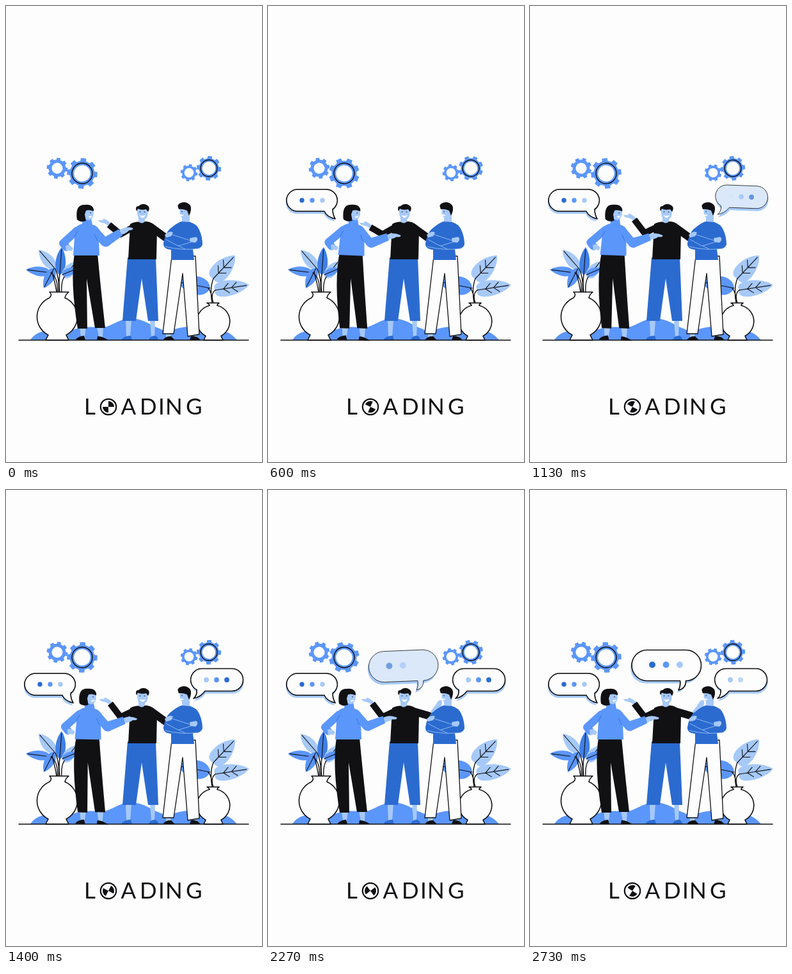
Recreate the animation shown at these times as an HTML page. Size 400 by 711 pixels, loop 2790 ms.

```html
<!DOCTYPE html>
<html lang="en">
<head>
<meta charset="utf-8">
<title>Loading</title>
<style>
  html, body { margin: 0; height: 100%; overflow: hidden; background: #fdfdfd; }
  svg { display: block; width: 100vw; height: 100vh; }
  .ink { fill: #111114; }
  .blue { fill: #5b96fb; }
  .deep { fill: #2b6bd0; }
  .skin { fill: #a6c9f8; }
  .paper { fill: #fdfdfd; }
  .mint { fill: #dae8fa; }
  .shade { fill: #a6c9f8; }
  .line { fill: none; stroke: #111114; stroke-width: 1.4; stroke-linecap: round; }
  .outlined { stroke: #111114; stroke-width: 1.6; stroke-linejoin: round; }
  .limb { fill: none; stroke-linejoin: round; stroke-linecap: round; }
  text { font: 35px Lato, "Open Sans", sans-serif; }
</style>
</head>
<body>
<svg viewBox="0 0 400 711" preserveAspectRatio="none">
  <rect class="paper" width="400" height="711"/>
  <g id="gears"></g>
  <path class="blue" d="M38 521C46 508 58 508 68 504Q85 512 104 505C120 499 135 500 150 502C168 498 178 487 196 487C216 488 226 498 240 503C252 510 262 502 284 500C306 500 316 506 330 505C345 506 354 512 361 521Z"/>
  <g id="plants"></g>

  <g class="paper outlined">
    <path d="M68 446H98Q93 450 92 455A32 32 0 0 1 94 513L98 521H62L66 513A32 32 0 0 1 68 455Q73 450 68 446Z"/>
    <path d="M314 463H333Q330 465 330 467A25.5 25.5 0 0 1 336 514.5L339 521H309L312 514.5A25.5 25.5 0 0 1 318 467Q318 465 314 463Z"/>
  </g>

  <g id="middleMan">
    <path class="skin" d="M187 490H196L194 516H188ZM225 490H233L232 516H227Z"/>
    <path class="deep" d="M180 521Q184 514 195 514L197 521ZM223 521Q225 514 233 514Q238 516 238 521Z"/>
    <path class="deep" d="M190 392H234L238 491H222L212 425L203 491H182Z"/>
    <path id="raisedHand" class="skin" d="M250 350Q259 340 266 329Q271 325 272 330Q273 337 265 345Q259 353 254 357Z"/>
    <path id="farArm" class="limb" stroke="#111114" stroke-width="12"/>
    <g id="nearHand"><path class="skin" d="M9 8Q3 3 -3 2Q-8 1 -9 -2L-1 -2Q-3 -5 1 -4Q6 -2 12 4Z"/></g>
    <path id="nearArm" class="limb" stroke="#111114" stroke-width="10" style="stroke-linecap:butt"/>
    <path class="ink" d="M194 340Q202 335 212 337Q222 334 230 340L236 350L235 395H191Z"/>
    <path class="skin" d="M207 329H217V336Q212 341 207 336Z"/>
    <path class="skin" d="M205 316H221Q224 332 213 334Q204 333 205 316Z"/>
    <path class="ink" d="M204 320Q201 312 207 312Q214 306 221 311Q226 314 222 321L219 317Q211 319 206 316Z"/>
    <path class="paper" d="M208 326Q213 328 218 326Q216 331 212 330Z"/>
    <path class="line" style="stroke-width:1" d="M209 321h1M216 321h1"/>
  </g>

  <g id="woman">
    <path class="skin" d="M115 500H125L123 516H117ZM142 500H152L151 516H145Z"/>
    <path class="ink" d="M108 521Q112 515 122 514L124 521ZM142 521L143 515Q149 514 160 521Z"/>
    <path class="ink" d="M107 386H143Q148 440 155 502H139L126 425L127 503H112Q100 430 107 386Z"/>
    <path class="limb" stroke="#5b96fb" stroke-width="12" d="M111 350L89 370L94 376"/>
    <path class="skin" d="M93 374Q99 371 105 378L102 382Q98 380 94 383Z"/>
    <path class="blue" d="M109 345Q115 340 119 340L120 331H133L135 341Q143 342 147 352L145 364L146 389H105L107 362Z"/>
    <path class="limb" stroke="#5b96fb" stroke-width="13" d="M139 351L154 368"/>
    <g id="forearm">
      <path class="skin" d="M177 350Q186 343 198 346Q200 349 192 350Q189 354 180 357Z"/>
      <path class="blue" d="M151 362L176 348L182 358L159 375Q151 377 148 370Z"/>
    </g>
    <path fill="none" stroke="#2b6bd0" stroke-width=".8" d="M107 360L112 351M143 366L138 356"/>
    <path class="skin" d="M121 316H136L137 324Q136 332 130 334L121 332Z"/>
    <path class="ink" d="M111 333C109 318 112 309 124 310C133 309 138 314 137 320Q130 317 125 319L123 325L125 335Q116 338 111 333Z"/>
    <path class="line" style="stroke-width:1" d="M132 322v1"/>
    <path class="paper" d="M129 328L135 327Q133 331 130 330Z"/>
  </g>

  <g id="rightMan">
    <path class="skin" d="M250 509H258L257 517H250ZM289 509H297L298 517H291Z"/>
    <path class="ink" d="M245 521Q249 515 258 515L264 521ZM287 521L289 515Q297 513 304 521Z"/>
    <path class="paper outlined" style="stroke-width:1.3" d="M259 390H296L302 512L284 515L276 417L262 511H245Z"/>
    <path class="skin" d="M275 326H287V340Q280 342 275 338Z"/>
    <path class="deep" d="M258 346Q266 339 274 336L288 337Q298 340 302 349Q307 360 307 372Q304 380 292 379L294 396H258L258 380Q245 379 246 370Q249 352 258 346Z"/>
    <path class="skin" d="M248 357Q254 350 261 353L258 359L250 361ZM287 362L297 360Q302 364 296 369L288 368Z"/>
    <path fill="none" stroke="#a6c9f8" stroke-width=".8" d="M258 356L289 366M250 364Q262 371 280 379M270 374L289 368M249 375Q275 382 303 378"/>
    <path class="skin" d="M272 315H286V325Q283 331 275 330Q270 326 272 315Z"/>
    <path class="ink" d="M270 317Q266 309 273 307Q282 304 288 311Q291 317 286 327L283 319Q276 316 270 317Z"/>
    <path class="line" style="stroke-width:1" d="M275 320v1"/>
    <path class="paper" d="M272 325L278 326Q275 329 272 327Z"/>
  </g>
  <path class="line" d="M20 521H379"/>
  <g id="bubbles"></g>

  <text class="ink" y="637" x="122 179.5 209 238 249 281">LADING</text>
  <circle class="line" cx="160" cy="625" r="12.2" style="stroke-width:2.2"/>
  <path id="spinner" class="ink" d="M0 0V-9A9 9 0 0 1 9 0ZM0 0V9A9 9 0 0 1 -9 0Z"/>
</svg>
<script>
const LOOP = 2790, STEP = LOOP / 42;
const $ = id => document.getElementById(id);
const set = (el, name, value) => el.setAttribute(name, value);
const ramp = (t, start, length) => Math.min(1, Math.max(0, (t - start) / length));
const ease = (t, start, length) => { const p = ramp(t, start, length); return p * p * (3 - 2 * p); };

const gears = [
  { x: 80, y: 253, r: 16.5, hole: 8.5, turn: 8, speed: -.03 },
  { x: 119, y: 261, r: 24, hole: 12.8, ring: 16, turn: 5, speed: .03 },
  { x: 286, y: 260, r: 13.5, hole: 7.3, turn: 10, speed: -.03 },
  { x: 317, y: 253, r: 19.3, hole: 10.2, ring: 13, turn: 5, speed: .03 }
];

function gearPath(r) {
  const points = [];
  for (let i = 0; i < 8; i++)
    for (const [offset, k] of [[-.23, .82], [-.17, 1], [.17, 1], [.23, .82]]) {
      const a = i * Math.PI / 4 + offset;
      points.push(`${Math.cos(a) * r * k} ${Math.sin(a) * r * k}`);
    }
  return `M${points.join("L")}Z`;
}

$("gears").innerHTML = gears.map(g => `<g>
  <path class="blue" d="${gearPath(g.r)}"/>
  ${g.ring ? `<circle class="line" r="${g.ring}"/>` : ""}
  <circle class="paper" r="${g.hole}"/></g>`).join("");

// A leaf runs from its base to its tip; leaves with side veins have a heart-shaped base.
function leaf(x1, y1, x2, y2, width, color, veins = 0) {
  const dx = x2 - x1, dy = y2 - y1, length = Math.hypot(dx, dy);
  const at = (along, side) =>
    `${x1 + dx * along - dy / length * side} ${y1 + dy * along + dx / length * side}`;
  const w = width * .66, back = veins ? -.15 : .1;
  let d = `M${at(0, 0)}L${at(.92, 0)}`;
  for (let i = 1; i <= veins; i++) {
    const a = i * .24;
    d += `M${at(a + .16, w * .45)}L${at(a, 0)}L${at(a + .16, -w * .45)}`;
  }
  return `<path fill="${color}" d="M${at(0, 0)}C${at(back, w)} ${at(.65, w)} ${at(1, 0)}C${at(.65, -w)} ${at(back, -w)} ${at(0, 0)}"/>
    <path class="line" style="stroke-width:1.1" d="${d}"/>`;
}

const pale = "#a6c9f8", deep = "#3f7fe6", bright = "#5b96fb";
$("plants").innerHTML =
  leaf(77, 410, 51, 380, 18, pale) + leaf(84, 419, 87, 376, 16, deep) +
  leaf(70, 416, 31, 411, 15, bright) + leaf(75, 409, 59, 440, 16, bright) +
  leaf(90, 424, 110, 398, 17, pale) + leaf(88, 419, 112, 409, 12, bright) +
  leaf(324, 425, 358, 389, 29, pale, 2) + leaf(327, 443, 380, 435, 25, pale, 2) +
  leaf(319, 440, 268, 430, 29, bright) +
  `<path class="line" d="M82 447Q84 425 77 410M84 447Q82 430 84 419M80 447Q82 424 70 416M79 447Q78 436 72 415M87 447Q86 432 90 424
    M322 463Q318 440 324 425M324 463Q319 449 327 443M322 463Q322 446 316 440"/>`;

const dotColors = ["#2b6bd0", "#5b96fb", "#a6c9f8"];
const bubbles = [
  { d: "M46 286H92a17 17 0 0 1 9 31Q101 325 105 332Q92 329 88 320H46a17 17 0 0 1 0-34Z",
    tail: [105, 331], shift: [-1, 4], dots: [53, 69, 85], y: 303, r: 3.7, tilt: -3, enter: 180, fade: 1560 },
  { d: "M306 278.5H353a17.5 17.5 0 0 1 0 35H311Q304 323 293 325Q299 320 298 311.5a17.5 17.5 0 0 1 8-33Z",
    tail: [293, 325], shift: [1, 4], dots: [345, 329, 313], y: 296, r: 3.9, tilt: 3, enter: 1000, fade: 2570 },
  { d: "M183 249.5H243.500a24 24 0 0 1 0 48Q244 309 232 312Q236 305 234.500 297.500H183a24 24 0 0 1 0-48z",
    tail: [233, 312], shift: [-2, 4], dots: [191, 212.5, 234], y: 272.5, r: 5, tilt: -3, enter: 2140, fade: 9999 }
];
$("bubbles").innerHTML = bubbles.map(b => `<g>
  <path class="shade" transform="translate(${b.shift})" d="${b.d}"/>
  <path class="mint outlined" style="stroke-width:.8" d="${b.d}"/>
  <path class="paper outlined" d="${b.d}"/>
  ${b.dots.map((x, i) => `<circle cx="${x}" cy="${b.y}" r="${b.r}" fill="${dotColors[i]}"/>`).join("")}
</g>`).join("");

function drawBubble(b, group, t) {
  const settle = ease(t, b.enter + 60, 200);
  set(group, "opacity", ramp(t, b.enter, 110));
  set(group, "transform", `rotate(${b.tilt * (1 - settle)} ${b.tail})`);
  set(group.children[2], "opacity", ramp(t, b.enter + 135, 130));
  b.dots.forEach((_, i) => {
    const shown = ramp(t, b.enter + 30 + i * 45, 150);
    const hidden = ramp(t, b.fade + i * 80, 120) - ramp(t, b.fade + 400 + i * 80, 120);
    set(group.children[3 + i], "opacity", shown * (1 - hidden));
  });
}

function draw(t) {
  gears.forEach((g, i) =>
    set($("gears").children[i], "transform", `translate(${g.x} ${g.y}) rotate(${g.turn + g.speed * t})`));
  bubbles.forEach((b, i) => drawBubble(b, $("bubbles").children[i], t));

  const sway = ease(t, 50, 500) - ease(t, 1090, 660);
  set($("woman"), "transform", `rotate(${2.2 * sway} 132 508)`);
  set($("forearm"), "transform", `rotate(${11 * ease(t, 0, 480)} 154 368)`);

  const dip = ease(t, 100, 450), lift = ease(t, 650, 400);
  const handX = 153 - dip + 3 * lift, handY = 336 + 4 * dip - 12 * lift;
  set($("nearHand"), "transform", `translate(${handX} ${handY})`);
  set($("nearArm"), "d", `M200 344L179 ${356 - 2 * lift}L${handX + 8} ${handY + 5}`);

  const reach = ease(t, 1900, 330);
  set($("farArm"), "d", `M227 345L${249 + 2 * reach} ${361 - 9 * reach}`);
  set($("raisedHand"), "transform", `translate(${-4 * (1 - reach)} ${24 * (1 - reach)})`);
  set($("raisedHand"), "opacity", ramp(reach, .1, .4));

  set($("spinner"), "transform", `translate(160 625) rotate(${t * -1.0125})`);
}

function tick(now) {
  draw(Math.floor(now % LOOP / STEP) * STEP);
  requestAnimationFrame(tick);
}
requestAnimationFrame(tick);
</script>
</body>
</html>
```
